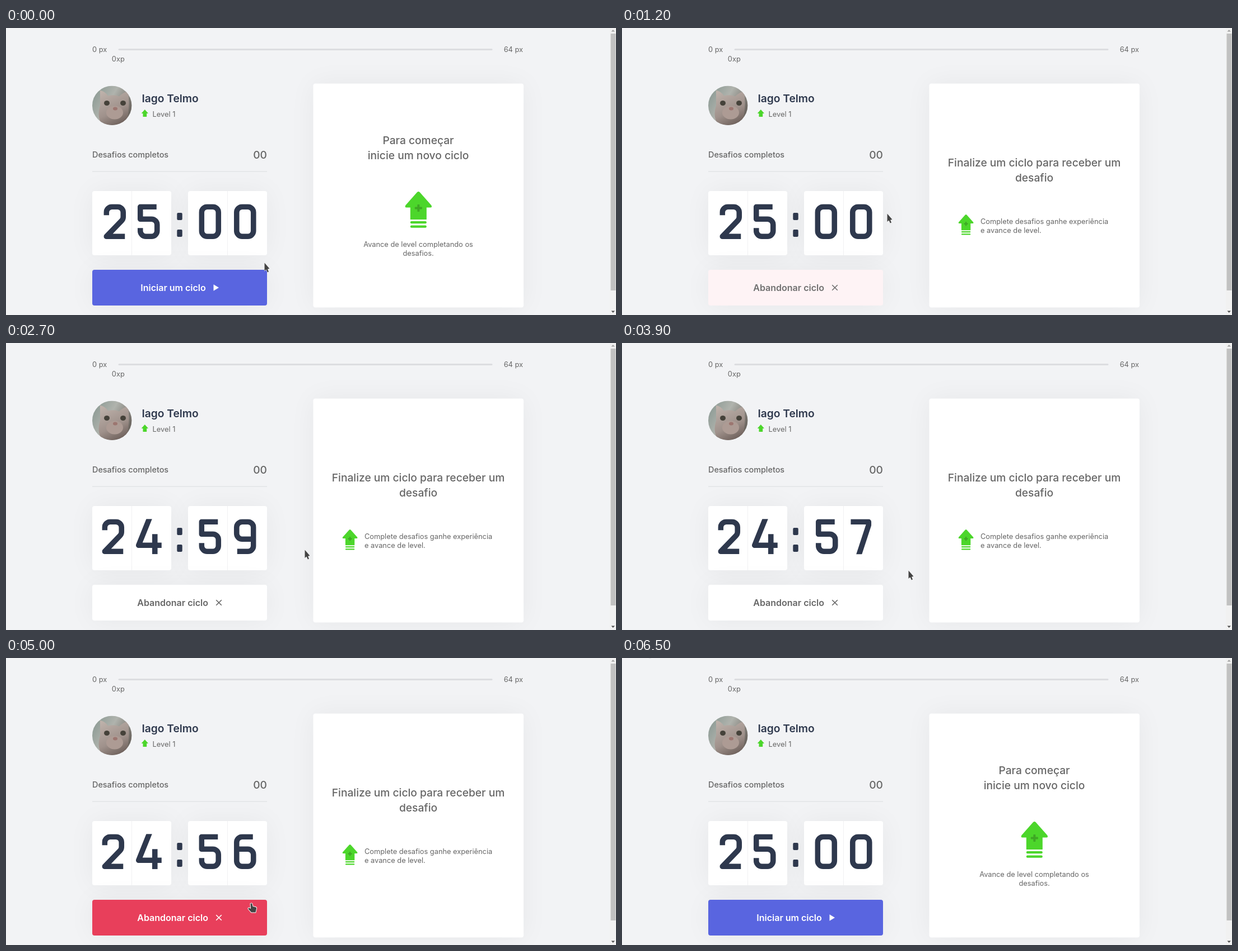
An HTML page with a canvas for the animation above (6700 ms loop, 1089 by 514 pixels).

```html
<!DOCTYPE html>
<html lang="pt-BR">
<head>
<meta charset="utf-8">
<title>Ciclo</title>
<style>
  html, body { margin: 0; width: 100%; height: 100%; overflow: hidden; background: #f2f3f5; }
  canvas { display: block; }
</style>
</head>
<body>
<canvas id="stage" width="1089" height="514"></canvas>
<script>
const ctx = document.getElementById('stage').getContext('2d');
const LOOP = 6700, STEP = 100, CLICK = 790, GIVE_UP = 5200;
const GRAY = '#666666', TITLE = '#2e384d', GREEN = '#4cd62b', LINE = '#dcdde0';
const WHITE = [255, 255, 255], TEXT = [102, 102, 102];
const BLUE = [89, 101, 224], NAVY = [73, 83, 184], RED = [232, 63, 91];

// Each change fades in over the previous look, as a CSS transition does.
const BUTTON_CHANGES = [
  { at: 200, fill: NAVY, text: WHITE },
  { at: CLICK, fill: RED, text: WHITE },
  { at: 1070, fill: WHITE, text: TEXT },
  { at: 4600, fill: RED, text: WHITE },
  { at: GIVE_UP, fill: NAVY, text: WHITE },
  { at: 5400, fill: BLUE, text: WHITE }
];

const POINTER_START = [461, 420];
const POINTER_MOVES = [
  { from: 0, to: 600, pos: [437, 441] },
  { from: 900, to: 1200, pos: [473, 332] },
  { from: 1400, to: 1800, pos: [511, 242] },
  { from: 1900, to: 2400, pos: [538, 340] },
  { from: 2600, to: 2700, pos: [533, 370] },
  { from: 3400, to: 3900, pos: [511, 407] },
  { from: 3900, to: 4200, pos: [484, 424] },
  { from: 4400, to: 5000, pos: [432, 439] },
  { from: 5300, to: 5500, pos: [309, 139] }
];

const clamp = p => Math.min(1, Math.max(0, p));
const ease = p => 1 - (1 - p ** 1.6) ** 4;
const mix = (a, b, p) => a.map((v, i) => v + (b[i] - v) * p);
const rgb = c => `rgb(${c.map(Math.round).join(',')})`;

function buttonColor(part, initial, t) {
  return rgb(BUTTON_CHANGES.reduce(
    (color, change) => mix(color, change[part], ease(clamp((t - change.at) / 200))), initial));
}

function pointerAt(t) {
  return POINTER_MOVES.reduce(
    (pos, m) => mix(pos, m.pos, clamp((t - m.from) / (m.to - m.from))), POINTER_START);
}

function rect(x, y, w, h, color, radius = 0) {
  ctx.fillStyle = color;
  ctx.beginPath();
  ctx.roundRect(x, y, w, h, radius);
  ctx.fill();
}

function card(x, y, w, h, color = '#fff') {
  ctx.save();
  ctx.shadowColor = 'rgba(0,0,0,0.05)';
  ctx.shadowBlur = 48;
  rect(x, y, w, h, color, 4);
  ctx.restore();
}

function label(text, x, y, size = 12.8, weight = 400, color = GRAY, align = 'left') {
  ctx.font = `${weight} ${size}px Inter, sans-serif`;
  ctx.textAlign = align;
  ctx.fillStyle = color;
  ctx.fillText(text, x, y);
}

function shape(d, color) {
  ctx.fillStyle = color;
  ctx.fill(new Path2D(d));
}

function ellipse(x, y, rx, ry, color) {
  ctx.fillStyle = color;
  ctx.beginPath();
  ctx.ellipse(x, y, rx, ry, 0, 0, Math.PI * 2);
  ctx.fill();
}

function at(x, y, scale, draw) {
  ctx.save();
  ctx.translate(x, y);
  ctx.scale(scale, scale);
  draw();
  ctx.restore();
}

// Digits run through named grid points; lower-case corners are rounded.
const GRID = {
  a: [5, 5], b: [35, 5], c: [5, 27], d: [35, 27], e: [5, 58], f: [35, 58],
  g: [5, 20], h: [5, 43], t: [20, 5], m: [20, 27], x: [34, 5], z: [38, 58],
  i: [25, -3], j: [5, 47], k: [46, 47], p: [34, 27], q: [34, 63],
  o: [0, 5], r: [32, 5], s: [32, 11], u: [14, 66]
};
const DIGITS = { 0: 'tbfeat', 2: 'gabdEZ', 4: 'IJK PQ', 5: 'XACdfeh', 6: 'XaefdC',
  7: 'ORSU', 8: 'tbdcat mdfecm' };
const digitWidth = digit => ({ 4: 46, 7: 37, 2: 38 })[digit] ?? 40;

function trace(run) {
  const points = [...run].map(name => GRID[name.toLowerCase()]);
  ctx.moveTo(...points[0]);
  for (let i = 1; i < points.length; i++) {
    const rounded = run[i] === run[i].toLowerCase() && i < points.length - 1;
    if (rounded) ctx.arcTo(...points[i], ...points[i + 1], 10);
    else ctx.lineTo(...points[i]);
  }
}

function drawDigit(digit, x) {
  at(x, 315.3, 1, () => {
    if (digit === '9') {
      ctx.translate(40, 63);
      ctx.rotate(Math.PI);
      digit = '6';
    }
    ctx.beginPath();
    ctx.rect(0, 0, 48, 63);
    ctx.clip();
    ctx.beginPath();
    DIGITS[digit].split(' ').forEach(trace);
    ctx.strokeStyle = TITLE;
    ctx.lineWidth = 9.6;
    ctx.lineJoin = 'round';
    ctx.stroke();
  });
}

function digitBox(x, pair) {
  const gap = 22.5;
  card(x, 292, 141, 115);
  rect(x + 70, 292, 1, 115, '#f0f1f3');
  const [first, second] = [...pair].map(digitWidth);
  const left = x + (141 - first - gap - second) / 2;
  drawDigit(pair[0], left);
  drawDigit(pair[1], left + first + gap);
}

function clock(t, active) {
  const elapsed = active ? Math.floor((t - CLICK) / 1000) : 0;
  digitBox(154, elapsed ? '24' : '25');
  digitBox(325, elapsed ? String(60 - elapsed) : '00');
  for (const y of [331, 361]) rect(305.3, y, 9.4, 13, TITLE, 2);
}

function button(t, active) {
  const color = buttonColor('text', WHITE, t);
  card(154, 433, 312, 64, buttonColor('fill', BLUE, t));
  if (active) {
    label('Abandonar ciclo', 234.3, 471, 16, 600, color);
    ctx.strokeStyle = color;
    ctx.lineWidth = 1.6;
    ctx.stroke(new Path2D('M375.2 460.2l9.6 9.6m0-9.6l-9.6 9.6'));
  } else {
    label('Iniciar um ciclo', 240.3, 471, 16, 600, color);
    shape('M370.5 459.3L380 465L370.5 470.7Z', color);
  }
}

function levelIcon(x, y, scale) {
  at(x, y, scale, () => {
    shape('M21 1.2Q23.5-1 26 1.2L46.5 24.5Q48.5 28.5 45 28.5H38V50H9V28.5H2Q-1.5 28.5 .5 24.5Z', GREEN);
    for (const top of [53, 60.5]) rect(9, top, 29, 4.2, GREEN, 2);
    rect(17, 27.5, 13, 4, '#3ea824', 1);
    rect(21.5, 23, 4, 13, '#3ea824', 1);
  });
}

function panel(active) {
  card(548.5, 99.5, 375.5, 401);
  const heading = (text, y) => label(text, 736, y, 19.2, 500, GRAY, 'center');
  const note = (text, y) => label(text, 736, y, 12.8, 400, GRAY, 'center');
  if (active) {
    heading('Finalize um ciclo para receber um', 248);
    heading('desafio', 275);
    levelIcon(600.8, 334, 0.565);
    label('Complete desafios ganhe experiência', 640, 351);
    label('e avance de level.', 640, 367);
  } else {
    heading('Para começar', 208);
    heading('inicie um novo ciclo', 235);
    levelIcon(712.8, 293, 1);
    note('Avance de level completando os', 392);
    note('desafios.', 408);
  }
}

function avatar() {
  ctx.save();
  ctx.beginPath();
  ctx.arc(189.2, 138.8, 35.2, 0, Math.PI * 2);
  ctx.clip();
  ctx.translate(154, 103.5);
  const wall = ctx.createLinearGradient(0, 0, 70, 40);
  wall.addColorStop(0, '#84958f');
  wall.addColorStop(0.5, '#b0b3ad');
  wall.addColorStop(1, '#6d6761');
  rect(0, 0, 71, 71, wall);
  const fur = ctx.createLinearGradient(20, 10, 50, 70);
  fur.addColorStop(0, '#bdb1aa');
  fur.addColorStop(0.6, '#9f918b');
  fur.addColorStop(1, '#6d5f5a');
  shape('M14 8Q23 10 28 18Q39 15 48 19Q56 11 64 10Q68 40 61 64L48 72H20Q7 59 14 35Z', fur);
  ellipse(40, 48, 15, 12, '#ad9b94');
  for (const x of [26, 55]) ellipse(x, 31, 5, 4.5, '#45423a');
  ellipse(41, 41, 4, 3, '#9c7670');
  ctx.restore();
}

function profile() {
  label('0 px', 154, 43);
  rect(200.5, 37, 668, 3, LINE, 1.5);
  label('64 px', 923, 43, 12.8, 400, GRAY, 'right');
  label('0xp', 200.3, 59.5, 12.8, 400, GRAY, 'center');
  avatar();
  label('Iago Telmo', 242.4, 133, 19.2, 600, TITLE);
  shape('M247.8 146L254 153H251.2V159H244.5V153H241.7Z', GREEN);
  label('Level 1', 261.6, 159);
  label('Desafios completos', 154, 232, 14.4, 500);
  label('00', 466, 234, 19.2, 500, GRAY, 'right');
  rect(154, 256.5, 312, 1, LINE);
}

function scrollbar() {
  rect(1078, 0, 11, 514, '#f1f1f1');
  rect(1079.5, 10, 9, 460, '#c1c1c1');
  shape('M1080.5 6.5L1083.7 3L1087 6.5Z', '#a3a3a3');
  shape('M1080.5 506.5H1087L1083.7 510Z', '#505050');
}

function pointer(t) {
  // The tail of the pointer peeks in at the top edge near the end.
  if (t >= 6300) rect(43 + Math.min(t - 6300, 200) / 40, 0, 4, 1, '#e2e3e5');
  if (t >= 5600) return;
  const [x, y] = pointerAt(t);
  const overButton = x < 466 && y >= 433;
  const outline = new Path2D(overButton
    ? 'M4.5 1Q6.5-.5 7.5 1.5L8.5 6L13 7Q15.5 7.5 15 10L13.5 16.5H6L1 11Q-.5 9 2 8.5L5 10Z'
    : 'M.5 .5V15L3.5 12.5L5.8 17.5L8 16.5L6 11.8L9.5 11Z');
  at(x, y, 1, () => {
    ctx.strokeStyle = '#fff';
    ctx.lineWidth = overButton ? 1.8 : 1;
    ctx.stroke(outline);
    ctx.fillStyle = '#434343';
    ctx.fill(outline);
  });
}

function draw(now) {
  const t = Math.floor((now % LOOP) / STEP) * STEP;
  const active = t >= CLICK && t < GIVE_UP;
  rect(0, 0, 1089, 514, '#f2f3f5');
  profile();
  clock(t, active);
  button(t, active);
  panel(active);
  scrollbar();
  pointer(t);
}

let start;
function tick(now) {
  start ??= now;
  draw(now - start);
  requestAnimationFrame(tick);
}
draw(0);
requestAnimationFrame(tick);
</script>
</body>
</html>
```
